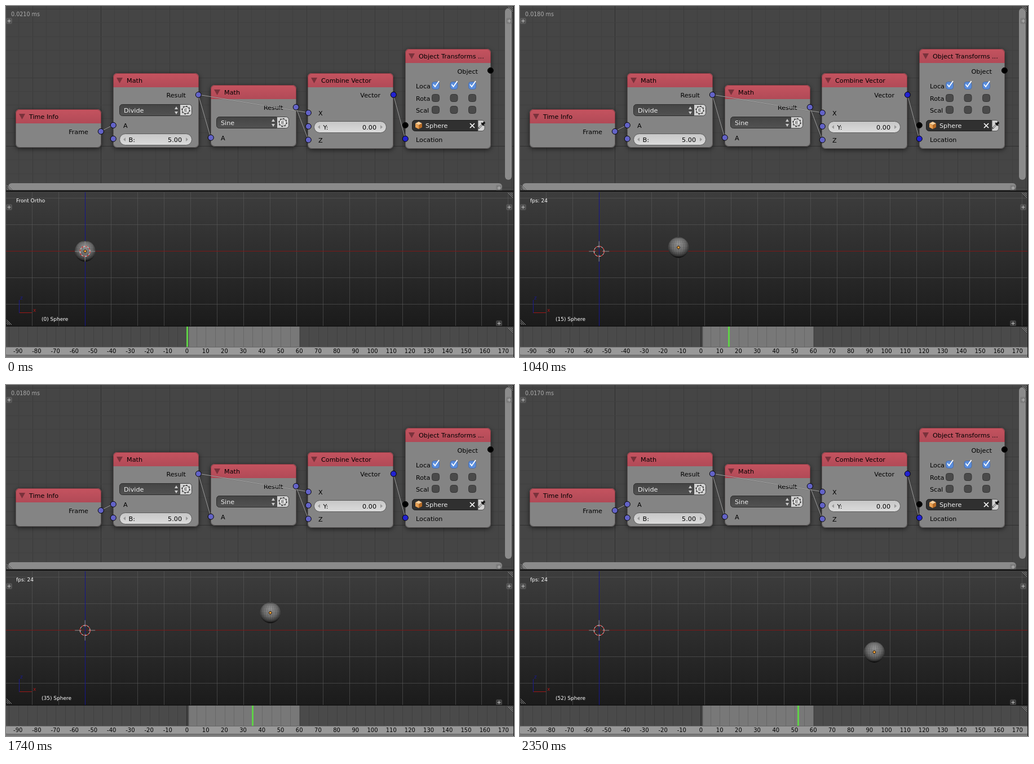
These frames come from a looping animation (901x622 px, 2.39 s). An HTML page with a canvas:

```html
<!DOCTYPE html>
<html>
<head>
<meta charset="utf-8">
<title>Node animation</title>
<style>
  html, body { margin: 0; width: 100%; height: 100%; overflow: hidden; background: #444; }
  canvas { display: block; }
</style>
</head>
<body>
<canvas id="stage" width="901" height="622"></canvas>
<script>
const g = document.getElementById('stage').getContext('2d');
const TAU = Math.PI * 2, LOOP = 2390;
const PURPLE = '#6363c7', BLUE = '#2222d0', BLACK = '#000';

function rect(x, y, w, h, fill) {
  g.fillStyle = fill;
  g.fillRect(x, y, w, h);
}
function box(x, y, w, h, r, fill, stroke) {
  g.beginPath();
  g.roundRect(x, y, w, h, r);
  if (fill) { g.fillStyle = fill; g.fill(); }
  if (stroke) { g.strokeStyle = stroke; g.lineWidth = 1; g.stroke(); }
}
function path(points, stroke, width = 1, fill) {
  g.beginPath();
  for (let i = 0; i < points.length; i += 2) g.lineTo(points[i], points[i + 1]);
  if (fill) { g.closePath(); g.fillStyle = fill; g.fill(); }
  if (stroke) { g.strokeStyle = stroke; g.lineWidth = width; g.stroke(); }
}
function disc(x, y, r, fill, stroke, width = 1) {
  g.beginPath();
  g.arc(x, y, r, 0, TAU);
  if (fill) { g.fillStyle = fill; g.fill(); }
  if (stroke) { g.strokeStyle = stroke; g.lineWidth = width; g.stroke(); }
}
function text(s, x, y, { size = 11.2, color = BLACK, align = 'left' } = {}) {
  g.font = `${size}px "DejaVu Sans", sans-serif`;
  g.fillStyle = color;
  g.textAlign = align;
  g.fillText(s, x, Math.round(y));
}
function fade(y0, y1, from, to) {
  const f = g.createLinearGradient(0, y0, 0, y1);
  f.addColorStop(0, from);
  f.addColorStop(1, to);
  return f;
}
const right = (s, x, y) => text(s, x, y, { align: 'right' });
const socket = (x, y, color) => disc(x + .3, y + .3, 5, color, BLACK);

// Area decorations
function plus(x, y) {
  box(x - 5, y - 5, 11, 11, 3, 'rgba(110,110,110,.45)');
  path([x - 2.5, y + .5, x + 3.5, y + .5], '#bbb');
  path([x + .5, y - 2.5, x + .5, y + 3.5], '#bbb');
}
function corner(x, y, dir) {
  for (const d of [3, 6, 9]) {
    path([x - dir * d, y, x, y + dir * d], '#bbb', .8);
    path([x - dir * (d + 1), y, x, y + dir * (d + 1)], '#111', .6);
  }
}
function scrollbar(x, y, w, h) {
  box(x, y, w, h, Math.min(w, h) / 2, '#8b8b8b');
}

// Nodes
function node(title, x, y, w, h) {
  g.save();
  g.shadowColor = 'rgba(0,0,0,.6)';
  g.shadowBlur = 8;
  g.shadowOffsetY = 2;
  box(x, y, w, h, 7, '#848484');
  g.restore();
  box(x, y, w, 25, [7, 7, 0, 0], fade(y, y + 25, '#c5535f', '#b14a57'));
  box(x + .5, y + .5, w - 1, h - 1, 7, null, 'rgba(35,25,25,.4)');
  path([x + 6, y + 8, x + 17, y + 8, x + 11.5, y + 18], null, 1, '#79323b');
  text(title, x + 24, y + 17);
}
function dropdown(label, x, y) {
  box(x + .5, y + .5, 107, 20, [5, 0, 0, 5], fade(y, y + 21, '#444', '#525252'), '#2c2c2c');
  text(label, x + 8, y + 15, { color: '#eee' });
  const cx = x + 101;
  path([cx - 3, y + 9, cx + 3, y + 9, cx, y + 4], null, 1, '#ccc');
  path([cx - 3, y + 13, cx + 3, y + 13, cx, y + 18], null, 1, '#ccc');
  box(x + 107.5, y + .5, 21, 20, [0, 5, 5, 0], '#d2d2d2', '#444');
  const gx = x + 118, gy = y + 10.5;
  g.setLineDash([2.6, 2.9]);
  disc(gx, gy, 7, null, '#333', 1.5);
  g.setLineDash([]);
  disc(gx, gy, 6, '#eee', '#333', .9);
  path([gx + 2.5, gy - 2.5, gx - 2, gy - 2.5, gx - 2, gy + 2.5, gx + 2.5, gy + 2.5], '#444', .9);
  path([gx - 2, gy, gx + 2, gy], '#444', .9);
}
function numberField(label, value, x, y) {
  box(x + .5, y + .5, 128, 20, 10, fade(y, y + 21, '#c6c6c6', '#dcdcdc'), '#5a5a5a');
  path([x + 11, y + 7, x + 11, y + 14, x + 7, y + 10.5], null, 1, '#999');
  path([x + 118, y + 7, x + 118, y + 14, x + 122, y + 10.5], null, 1, '#999');
  text(label, x + 16.5, y + 15);
  right(value, x + 111, y + 15);
}
function checkbox(x, y, on) {
  box(x + .5, y + .5, 13, 13, 4, on ? '#5a8ddc' : '#4a4a4a', on ? '#4a6ca8' : '#363636');
  if (on) path([x + 3, y + 5, x + 6, y + 9, x + 13, y - 1], '#fff', 1.8);
}

function nodeEditor(ms) {
  rect(0, 0, 901, 328, '#454545');
  const step = 24.3;
  const shade = i => i === 0 ? '#303030' : i % 5 ? '#404040' : '#3a3a3a';
  for (let i = -6; i < 31; i++) rect(Math.round(168 + i * step), 0, 1, 328, shade(i));
  for (let i = -10; i < 4; i++) rect(0, Math.round(248 + i * step), 901, 1, shade(i));
  text(ms, 9, 18, { size: 9.6, color: '#aaa' });

  scrollbar(885, 4, 12, 304);
  scrollbar(4, 314, 876, 12);
  plus(5, 26); plus(892, 26); plus(874, 322);
  corner(899, 1, 1); corner(1, 326, -1);

  node('Time Info', 17, 183, 152, 68);
  right('Frame', 146, 227);

  node('Math', 190, 119, 152, 132);
  right('Result', 319, 162);
  dropdown('Divide', 201, 174);
  text('A', 208, 216);
  numberField('B:', '5.00', 201, 226);

  node('Math', 363, 140, 152, 109);
  right('Result', 491.5, 184);
  dropdown('Sine', 373, 196);
  text('A', 381, 238);

  node('Combine Vector', 535, 119, 152, 134);
  right('Vector', 664, 162);
  text('X', 554, 194);
  numberField('Y:', '0.00', 546, 204);
  text('Z', 554, 242);

  node('Object Transforms ...', 708, 76, 152, 177);
  right('Object', 837, 120);
  ['Loca', 'Rota', 'Scal'].forEach((label, row) => {
    const y = Math.floor(134.5 + row * 21.5);
    text(label, 727, y + 12);
    for (let col = 0; col < 3; col++) checkbox(755 + col * 32.5, y, row === 0);
  });
  box(720.5, 202.5, 116, 19, [5, 0, 0, 5], '#303030', '#1c1c1c');
  path([726, 208, 732, 205, 738, 208, 732, 211], null, 1, '#f7cf9b');
  path([726, 208, 732, 211, 732, 218, 726, 215], null, 1, '#e8a053');
  path([738, 208, 732, 211, 732, 218, 738, 215], null, 1, '#b56a25');
  text('Sphere', 744, 216, { color: '#eee' });
  path([823, 208, 831, 216], '#fff', 1.7);
  path([831, 208, 823, 216], '#fff', 1.7);
  box(837, 202.5, 12, 19, [0, 5, 5, 0], '#d2d2d2', '#555');
  path([838, 217, 845, 210], '#333', 2.6);
  path([839, 216, 844, 211], '#eee', 1.2);
  path([843, 207, 848, 212], '#111', 2);
  path([845, 210, 849, 206], '#111', 3.5);
  text('Location', 727, 241);

  const links = [[168, 222, 190, 211], [341, 157, 363, 233], [341, 157, 536, 189],
    [514, 179, 536, 237], [687, 157, 708, 235]];
  for (const link of links) {
    path(link, 'rgba(40,40,40,.25)', 2);
    path(link, 'rgba(185,185,185,.8)');
  }
  [[168, 222], [190, 211], [190, 235], [341, 157], [363, 233], [514, 179], [536, 189], [536, 213], [536, 237]]
    .forEach(([x, y]) => socket(x, y, PURPLE));
  socket(687, 157, BLUE); socket(708, 235, BLUE);
  socket(859, 114, BLACK); socket(708, 211, BLACK);
}

function sphere(x, y) {
  const shade = g.createRadialGradient(x, y - 7, 2, x, y - 5, 24);
  shade.addColorStop(0, '#909090');
  shade.addColorStop(.5, '#6c6c6c');
  shade.addColorStop(.8, '#3e3e3e');
  shade.addColorStop(1, '#080808');
  disc(x, y, 18.3, shade);
  g.strokeStyle = 'rgba(20,20,20,.1)';
  g.lineWidth = .7;
  for (let a = -75; a <= 75; a += 15) {
    const s = Math.sin(a * TAU / 360) * 18, c = Math.cos(a * TAU / 360) * 18;
    g.beginPath();
    g.moveTo(x - c, y + s);
    g.lineTo(x + c, y + s);
    g.stroke();
    g.beginPath();
    g.ellipse(x, y, Math.abs(s), 18, 0, 0, TAU);
    g.stroke();
  }
}
function cursor(x, y) {
  for (const [dx, dy] of [[1, 0], [-1, 0], [0, 1], [0, -1]])
    path([x + dx * 6, y + dy * 6, x + dx * 18, y + dy * 18], '#8c8c8c');
  disc(x, y, 9, null, '#e8e8e8', 1);
  g.setLineDash([3.53, 3.53]);
  disc(x, y, 9, null, '#e01818', 1.1);
  g.setLineDash([]);
}

function viewport(pose, frame, header) {
  rect(0, 328, 901, 240, fade(330, 567, '#3d3d3d', '#1b1b1b'));
  const unit = 46.93;
  for (let i = -2; i < 17; i++) rect(Math.floor(140 + i * unit), 330, 1, 237, 'rgba(90,90,90,.6)');
  for (let i = -2; i < 3; i++) rect(0, Math.round(434 + i * unit), 901, 1, 'rgba(90,90,90,.6)');
  rect(0, 434, 901, 1, '#7d1717');
  rect(140, 330, 1, 237, '#15158f');

  const x = 140.3 + pose / 5 * unit, y = 434.5 - Math.sin(pose / 5) * unit;
  sphere(x, y);
  disc(x, y, 2.4, '#f3a33a', '#201000');
  cursor(140.2, 434.8);

  path([23, 543.5, 46, 543.5], '#a01818');
  path([23.5, 544, 23.5, 521], '#1a1a90');
  text('x', 48, 542, { size: 9, color: '#b01818' });
  text('z', 25, 520, { size: 9, color: '#1a1a90' });
  const label = { size: 9, color: '#fff' };
  text(header, 18, 348, label);
  text(`(${frame}) Sphere`, 63, 558, label);

  plus(5, 356); plus(892, 356); plus(874, 562);
  corner(899, 331, 1); corner(1, 565, -1);
  rect(0, 327, 901, 2, '#111');
}

function timeline(pose) {
  const at = n => 321 + n * 3.325;
  rect(0, 568, 901, 54, '#4a4a4a');
  rect(at(1), 568, at(60) - at(1), 36, '#787878');
  for (let n = -95; n <= 175; n += 5) rect(Math.round(at(n)), 568, 1, 36, 'rgba(0,0,0,.13)');
  rect(320, 568, 2, 36, '#333');
  rect(Math.round(at(pose) - 1.5), 568, 3, 37, '#5fd147');
  rect(0, 604, 901, 18, '#777');
  box(-4, 604.5, 909, 14, 7, '#999', '#666');
  for (let n = -90; n <= 170; n += 10) {
    const x = 321 + n * 3.32 - (n < 0 ? 1 : n >= 100 ? 3 : 0);
    text(n, x, 615, { size: 10, align: 'center' });
  }
  corner(899, 570, 1);
  rect(0, 567, 901, 1, '#0c0c0c');
  rect(900, 0, 1, 622, '#151515');
}

// Playback: 40 ms steps, a few of them 10 ms longer
const slowSteps = [4, 8, 26, 28, 34];
const startOf = k => 500 + 40 * k + 10 * slowSteps.filter(s => s < k).length;

function draw(time) {
  let step = -1;
  while (step < 45 && startOf(step + 1) <= time) step++;
  // Playback drops about one frame in seven
  const frame = step < 0 ? 0 : 1 + Math.max(0, Math.floor(step * 1.157 - .1));
  const pose = step < 1 ? 0 : frame;
  const phase = step % 9;
  const ms = step < 1 ? 21 : phase > 0 && phase < 5 ? 18 : 17;
  const header = step < 0 ? 'Front Ortho' : `fps: ${step < 13 ? 25 : 24}`;

  nodeEditor(`0.0${ms}0 ms`);
  viewport(pose, frame, header);
  timeline(pose);
}

const begin = performance.now();
function tick() {
  draw((performance.now() - begin) % LOOP);
  requestAnimationFrame(tick);
}
tick();
</script>
</body>
</html>
```
